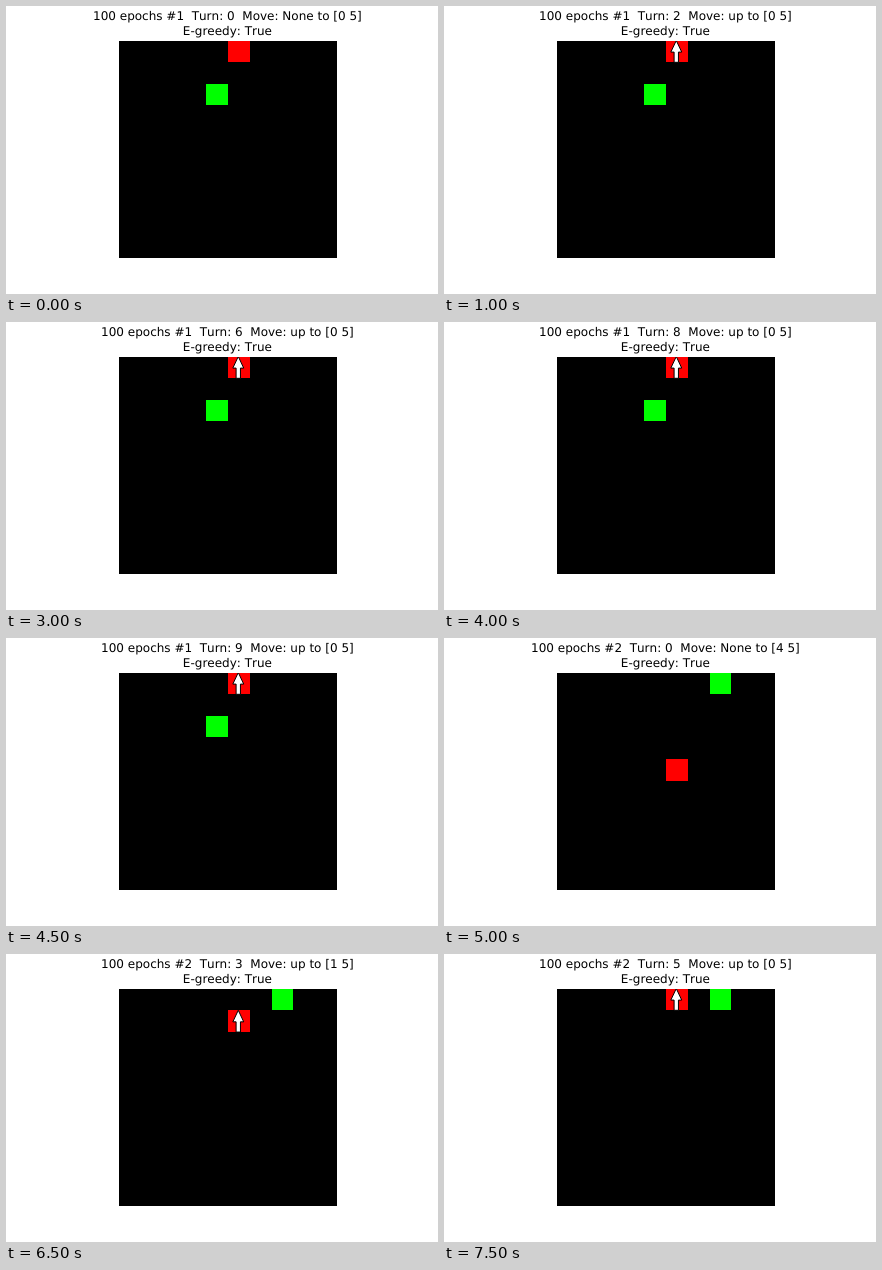
These frames come from a looping animation (432x288 px, 8000 ms). An HTML page with a canvas:

```html
<!DOCTYPE html>
<html lang="en">
<head>
<meta charset="utf-8">
<title>Grid walk</title>
<style>
  html, body { margin: 0; width: 100%; height: 100%; overflow: hidden; background: #fff; }
  canvas, svg { position: absolute; left: 0; top: 0; display: block; }
  text {
    font: 12px "DejaVu Sans", sans-serif;
    font-kerning: none;
    text-anchor: middle;
    text-rendering: geometricPrecision;
    white-space: pre;
  }
</style>
</head>
<body>
<canvas id="board" width="432" height="288"></canvas>
<svg width="432" height="288">
  <text id="title" x="221.4" y="14"></text>
  <text x="221.4" y="29">E-greedy: True</text>
</svg>
<script>
const ctx = document.getElementById('board').getContext('2d');
const title = document.getElementById('title');
const STEP = 500, LOOP = 8000;
const BOARD = [113, 35, 218, 217];

// Each run starts at a row and walks up until it meets the top wall.
const runs = [
  { id: 1, from: 0, turns: 10, start: 0, col: 5, goal: [2, 4] },
  { id: 2, from: 10, turns: 6, start: 4, col: 5, goal: [0, 7] }
];

const edgeX = c => Math.round(113 + c * 21.8);
const edgeY = r => Math.floor(35 + r * 21.65);

function fillCell(r, c, color) {
  const x = edgeX(c), y = edgeY(r);
  ctx.fillStyle = color;
  ctx.fillRect(x, y, edgeX(c + 1) - x, edgeY(r + 1) - y);
}

function arrowUp(r, c) {
  const cell = 21.744;
  const x = 112.68 + (c + 0.5) * cell;
  const top = 34.56 + r * cell;
  const neck = top + cell * 0.53, end = top + cell;
  const head = cell / 4, shaft = cell / 10;
  ctx.save();
  ctx.beginPath();
  ctx.rect(...BOARD);
  ctx.clip();
  ctx.beginPath();
  ctx.moveTo(x, top);
  ctx.lineTo(x + head, neck);
  ctx.lineTo(x + shaft, neck);
  ctx.lineTo(x + shaft, end);
  ctx.lineTo(x - shaft, end);
  ctx.lineTo(x - shaft, neck);
  ctx.lineTo(x - head, neck);
  ctx.closePath();
  ctx.fillStyle = '#fff';
  ctx.fill();
  ctx.strokeStyle = '#000';
  ctx.lineWidth = 1;
  ctx.stroke();
  ctx.restore();
}

function draw(step) {
  const run = runs.find(r => step < r.from + r.turns);
  const turn = step - run.from;
  const row = Math.max(0, run.start - turn);
  const move = turn ? 'up' : 'None';

  ctx.fillStyle = '#000';
  ctx.fillRect(...BOARD);
  fillCell(...run.goal, '#0f0');
  fillCell(row, run.col, '#f00');
  if (turn) arrowUp(row, run.col);
  title.textContent =
    `100 epochs #${run.id}  Turn: ${turn}  Move: ${move} to [${row} ${run.col}]`;
}

let shown = -1;
const begin = performance.now();
function tick() {
  const t = Math.max(0, performance.now() - begin) % LOOP;
  const step = Math.floor(t / STEP);
  if (step !== shown) draw(shown = step);
  requestAnimationFrame(tick);
}
tick();
</script>
</body>
</html>
```
